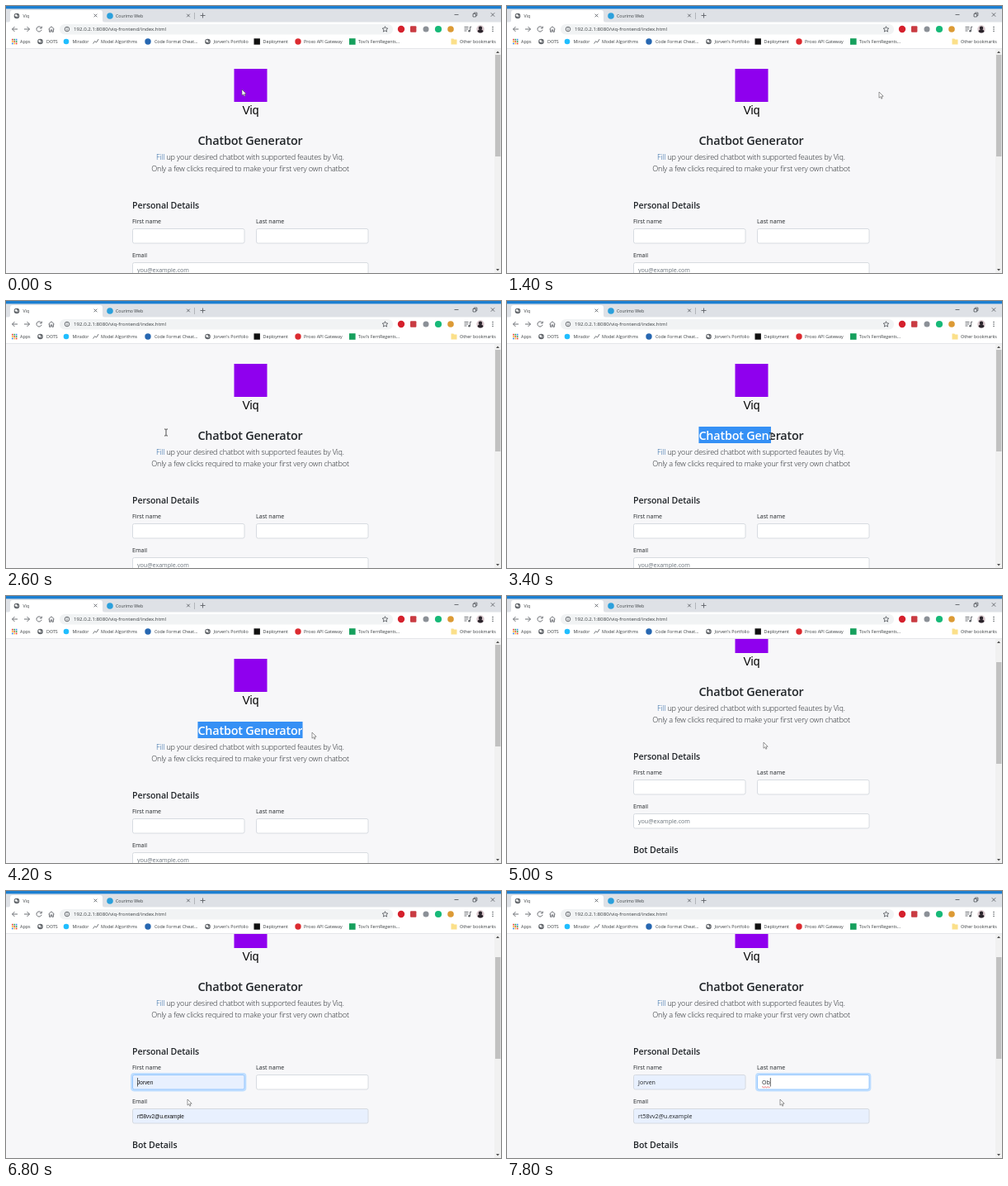
Animation, 600 px wide and 323 px high, one loop 8 s. Source, as an HTML page:

```html
<!DOCTYPE html>
<html lang="en">
<head>
<meta charset="utf-8">
<title>Chatbot Generator</title>
<style>
html, body { margin: 0; width: 100%; height: 100%; overflow: hidden; background: #f7f7f9; }
svg { display: block; width: 100%; height: 100%; }
text { font-family: "Open Sans", "Noto Sans", sans-serif; fill: #212529; }
.tab { font-size: 5.2px; fill: #3c4043; }
.url { font-size: 6.15px; fill: #3c4043; }
.mark { font-size: 5.35px; fill: #3c4043; }
.brand { font: 13.9px "Liberation Sans", sans-serif; fill: #000; }
.title { font-size: 14.4px; font-weight: 600; letter-spacing: -.2px; }
.lead { font-size: 9.1px; font-weight: 300; letter-spacing: -.16px; }
.head { font-size: 10.6px; font-weight: 600; letter-spacing: -.1px; }
.body { font-size: 7.1px; }
.hint { fill: #6c757d; }
.preview { font: 6.4px "Liberation Sans", sans-serif; fill: #111; }
.mid { text-anchor: middle; }
.line { fill: none; stroke: #5f6368; stroke-width: .9; }
</style>
</head>
<body>
<svg id="stage" viewBox="0 0 600 323"></svg>
<script>
const LOOP = 8000, STEP = 200, SCROLL = 47;
const stage = document.getElementById('stage');

const rect = (x, y, w, h, fill, more = '') =>
  `<rect x="${x}" y="${y}" width="${w}" height="${h}" fill="${fill}" ${more}/>`;
const dot = (x, y, r, fill, more = '') =>
  `<circle cx="${x}" cy="${y}" r="${r}" fill="${fill}" ${more}/>`;
const text = (x, y, cls, s, more = '') =>
  `<text x="${x}" y="${y}" class="${cls}" ${more}>${s}</text>`;
const line = (d, more = '') => `<path class="line" d="${d}" ${more}/>`;
const cross = (x, y, r) => line(`M${x - r} ${y - r}l${2 * r} ${2 * r}m0 ${-2 * r}l${-2 * r} ${2 * r}`);
const globe = (x, y) => dot(x, y, 3.3, '#5f6368') +
  `<path d="M${x - 2.2} ${y - 1}q1.8 -1.5 2.5 0t-1 2zM${x + .8} ${y + 1.6}l1.4 -2.2" fill="#fff" stroke="#fff" stroke-width=".6"/>`;
const field = (id, x, y, w) =>
  rect(x + .5, y + .5, w - .5, 17.5, '#fff', `id="${id}" rx="2" stroke="#ced4da" stroke-width=".8"`);

function tabs() {
  return rect(0, 0, 600, 20, '#dee1e6') + rect(0, 0, 600, 3.4, '#1c7fd1') +
    '<path d="M2 20q3 0 3 -3v-9q0 -3 3 -3h106q3 0 3 3v9q0 3 3 3z" fill="#fff"/>' +
    globe(13, 12) + text(20.5, 13.5, 'tab', 'Viq') + cross(108.5, 11.5, 1.8) +
    dot(126, 12, 3.8, '#2ba0dc') + text(133, 13.5, 'tab', 'Courimo Web') + cross(221, 11.5, 1.8) +
    line('M228.5 8v8', 'opacity=".4"') + line('M235.5 11.5h6m-3 -3v6') +
    line('M543.5 10.5h5M566 9.5h3.5v3.5h-3.5zM567.3 9.5v-1.4h3.6v3.6h-1.4') + cross(590, 10.5, 2.2);
}

function toolbar() {
  let s = rect(0, 19.5, 600, 32, '#fff') +
    line('M14 28h-6.5m3 -3l-3 3l3 3') + line('M22 28h6.5m-3 -3l3 3l-3 3') +
    line('M42.7 26.2a3.1 3.1 0 1 0 .4 2.6M43.3 24.6v2.3h-2.4') +
    line('M51.5 28l3.5 -3.2l3.5 3.2M52.6 27.5v3.8h1.6v-2.4h1.6v2.4h1.6v-3.8') +
    rect(65, 22, 404, 12.5, '#f1f3f4', 'rx="6.2"') +
    dot(74, 28, 2.8, 'none', 'class="line"') + line('M74 27.6v2M74 26v.8') +
    text(82, 30.2, 'url', '192.0.2.1:8080/viq-frontend/index.html') +
    line('M459.5 24.7l1 2.2l2.4 .2l-1.8 1.6l.5 2.4l-2.1 -1.3l-2.1 1.3l.5 -2.4l-1.8 -1.6l2.4 -.2z', 'stroke-width=".7"');
  s += dot(479, 28, 4.2, '#d5202c') + rect(490, 24.3, 7.4, 7.4, '#c93b42', 'rx="1"') +
    dot(509, 28, 3.5, '#8b9097') + dot(524, 28, 4.1, '#17b978') + dot(539, 28, 3.8, '#dc9a35') +
    line('M555.5 25.5h5M555.5 27.8h5M555.5 30h3M562.5 30.2v-5h1.8') + dot(561.5, 30.3, 1.3, '#5f6368') +
    dot(575, 28, 4.7, '#d9c8cd') + dot(575, 26.7, 2.2, '#2b252c') +
    '<path d="M571.5 31q.4 -2.8 3.5 -2.8t3.5 2.8q-3.5 3 -7 0" fill="#2b252c"/>';
  for (const y of [25.5, 28, 30.5]) s += dot(590, y, .8, '#5f6368');
  return s;
}

function bookmarks() {
  const colors = ['#e8453c', '#34a853', '#4285f4', '#f9bb2d'];
  let s = '';
  for (let i = 0; i < 9; i++)
    s += rect(7 + i % 3 * 2.4, 39.8 + Math.floor(i / 3) * 2.4, 1.7, 1.7, colors[i % 4]);
  s += globe(41.5, 43) + dot(73, 43, 3.3, '#20beff') +
    line('M105.5 45.5l2.2 -3l1.8 1.6l2.6 -4') + dot(172, 43, 3.7, '#2767b1') + globe(244.5, 43) +
    rect(300.5, 39.3, 7.4, 7.4, '#111') + dot(354, 43, 3.7, '#dc2b30') +
    rect(416, 39.2, 7.6, 7.6, '#16a05d') +
    '<path d="M539.5 39.6h2.8l1 1h3.2v6h-7z" fill="#fbe08a"/>';
  const marks = [[17, 'Apps'], [49, 'DOTS'], [80.5, 'Mirador'], [115, 'Model Algorithms'],
    [180, 'Code Format Cheat...'], [251.5, "Jorven's Portfolio"], [311.5, 'Deployment'],
    [361, 'Proxo API Gateway'], [427, "Tovi's FernRegents..."], [550, 'Other bookmarks']];
  return s + marks.map(([x, name]) => text(x, 45, 'mark', name)).join('') +
    rect(0, 51, 600, .7, '#dcdee1');
}

function page() {
  return rect(276.5, 76, 40, 40, '#8f00ee') + text(296.5, 131, 'brand mid', 'Viq') +
    text(296, 168, 'title mid', 'Chatbot Generator', 'id="title"') +
    `<g id="picked">${rect(232, 152, 0, 20, '#3590f5', 'id="pick"')}
      <g clip-path="url(#pickClip)">${text(296, 168, 'title mid', 'Chatbot Generator', 'style="fill:#fff"')}</g></g>` +
    text(296, 185.5, 'lead mid', '<tspan fill="#1f5f9f">Fill</tspan> up your desired chatbot with supported feautes by Viq.') +
    text(296, 199.7, 'lead mid', 'Only a few clicks required to make your first very own chatbot') +
    text(153, 244.7, 'head', 'Personal Details') +
    text(153, 263, 'body', 'First name') + text(303, 263, 'body', 'Last name') +
    text(153, 303.5, 'body', 'Email') + text(153, 358, 'head', 'Bot Details') +
    rect(152.2, 268.2, 138.1, 20.1, 'none', 'id="glow" rx="3" stroke="#bfdeff" stroke-width="2.2"') +
    field('first', 153, 269, 136) + field('last', 303, 269, 136) + field('email', 153, 310, 286) +
    text(159, 281, 'body', '', 'id="firstText"') + text(309, 281, 'body', '', 'id="lastText"') +
    text(159, 322, 'body hint', '', 'id="emailText"') +
    line('M309 284.3q.8 -1.2 1.6 0t1.6 0t1.6 0t1.6 0t1.6 0t1.6 0', 'id="squiggle" style="stroke:#e0353b;stroke-width:.7"') +
    rect(159, 273, .7, 10.5, '#222', 'id="caret"');
}

stage.innerHTML = `<defs>
    <clipPath id="view"><rect y="51.7" width="592" height="272"/></clipPath>
    <clipPath id="pickClip"><rect id="pickMask" y="152" height="20"/></clipPath>
  </defs>` +
  rect(0, 0, 600, 323, '#f7f7f9') +
  `<g clip-path="url(#view)"><g id="page">${page()}</g></g>` +
  tabs() + toolbar() + bookmarks() +
  rect(592, 51.7, 8, 272, '#f1f1f1') +
  rect(593, 59, 6.4, 123, '#c1c1c1', 'id="thumb"') +
  '<path d="M594 57l2 -2.4l2 2.4zM594 318l2 2.4l2 -2.4z" fill="#505050"/>' +
  `<g id="cursor">
    <path id="arrow" d="M0 0v7.2l1.7 -1.5l1.1 2.5l1.2 -.6l-1.1 -2.4h2.3z" fill="#fff" stroke="#555" stroke-width=".6"/>
    <path id="beam" d="M-2 -4h1.5l.5 .5l.5 -.5h1.5M0 -3.5v7M-2 4h1.5l.5 -.5l.5 .5h1.5" fill="none" stroke="#222" stroke-width=".8"/>
  </g>`;

const el = {};
stage.querySelectorAll('[id]').forEach(n => el[n.id] = n);
const set = (node, attrs) => { for (const k in attrs) node.setAttribute(k, attrs[k]); };
const show = (node, on) => set(node, { visibility: on ? 'visible' : 'hidden' });
const clamp = (v, a, b) => Math.min(b, Math.max(a, v));
const ease = p => p * p * (3 - 2 * p);

// time, x, y
const path = [[0, 286, 101], [200, 286, 101], [1400, 451, 104], [2600, 194, 159], [2800, 226, 161],
  [3800, 371, 165], [4200, 371, 165], [5000, 311, 177], [5800, 220, 231], [6200, 220, 231],
  [6600, 220, 252], [7000, 220, 252], [7200, 331, 231], [7400, 331, 233], [7800, 331, 252]];

function pointer(t) {
  const i = path.findIndex(k => k[0] > t);
  if (i < 0) return path[path.length - 1].slice(1);
  const [a, b] = [path[i - 1], path[i]];
  const p = ease((t - a[0]) / (b[0] - a[0]));
  return [a[1] + (b[1] - a[1]) * p, a[2] + (b[2] - a[2]) * p];
}

function draw(t) {
  const [x, y] = pointer(t);
  const scroll = SCROLL * ease(clamp((t - 4400) / 400, 0, 1));
  set(el.page, { transform: `translate(0 ${-scroll})` });
  set(el.thumb, { y: 59 + scroll * 21 / SCROLL });

  const beam = t >= 2400 && t < 4000 || t > 5400 && y > 222 && y < 240;
  set(el.cursor, { transform: `translate(${x} ${y})` });
  show(el.beam, beam);
  show(el.arrow, !beam);

  const w = el.title.getComputedTextLength(), left = 296 - w / 2;
  const pick = { x: left, width: clamp(x - left, 0, w) };
  set(el.pick, pick);
  set(el.pickMask, pick);
  show(el.picked, t >= 2800 && t < 4600);

  const preview = t >= 6600 && t < 7000, filled = t >= 6600;
  const onFirst = t >= 5800 && t < 7200, onLast = t >= 7200;
  const typed = 'Ob'.slice(0, clamp(Math.floor((t - 7400) / STEP), 0, 2));
  const tint = filled ? '#e8f0fe' : '#fff';
  set(el.first, { fill: tint, stroke: onFirst ? '#80bdff' : '#ced4da' });
  set(el.last, { stroke: onLast ? '#80bdff' : '#ced4da' });
  set(el.email, { fill: tint });
  set(el.glow, { x: onLast ? 302.2 : 152.2 });
  show(el.glow, onFirst || onLast);

  el.firstText.textContent = filled ? 'Jorven' : '';
  el.lastText.textContent = typed;
  el.emailText.textContent = filled ? 'rt58vv2@u.example' : 'you@example.com';
  set(el.firstText, { class: preview ? 'preview' : 'body' });
  set(el.emailText, { class: preview ? 'preview' : filled ? 'body' : 'body hint' });

  const box = onLast ? el.lastText : el.firstText;
  const offset = preview || !box.textContent ? 0 : box.getComputedTextLength();
  set(el.caret, { x: (onLast ? 309 : 159) + offset });
  show(el.caret, onFirst || onLast);
  show(el.squiggle, typed.length === 2);
}

const start = performance.now();
function tick() {
  const t = (performance.now() - start) % LOOP;
  draw(Math.floor(t / STEP) * STEP);
  requestAnimationFrame(tick);
}
tick();
</script>
</body>
</html>
```
